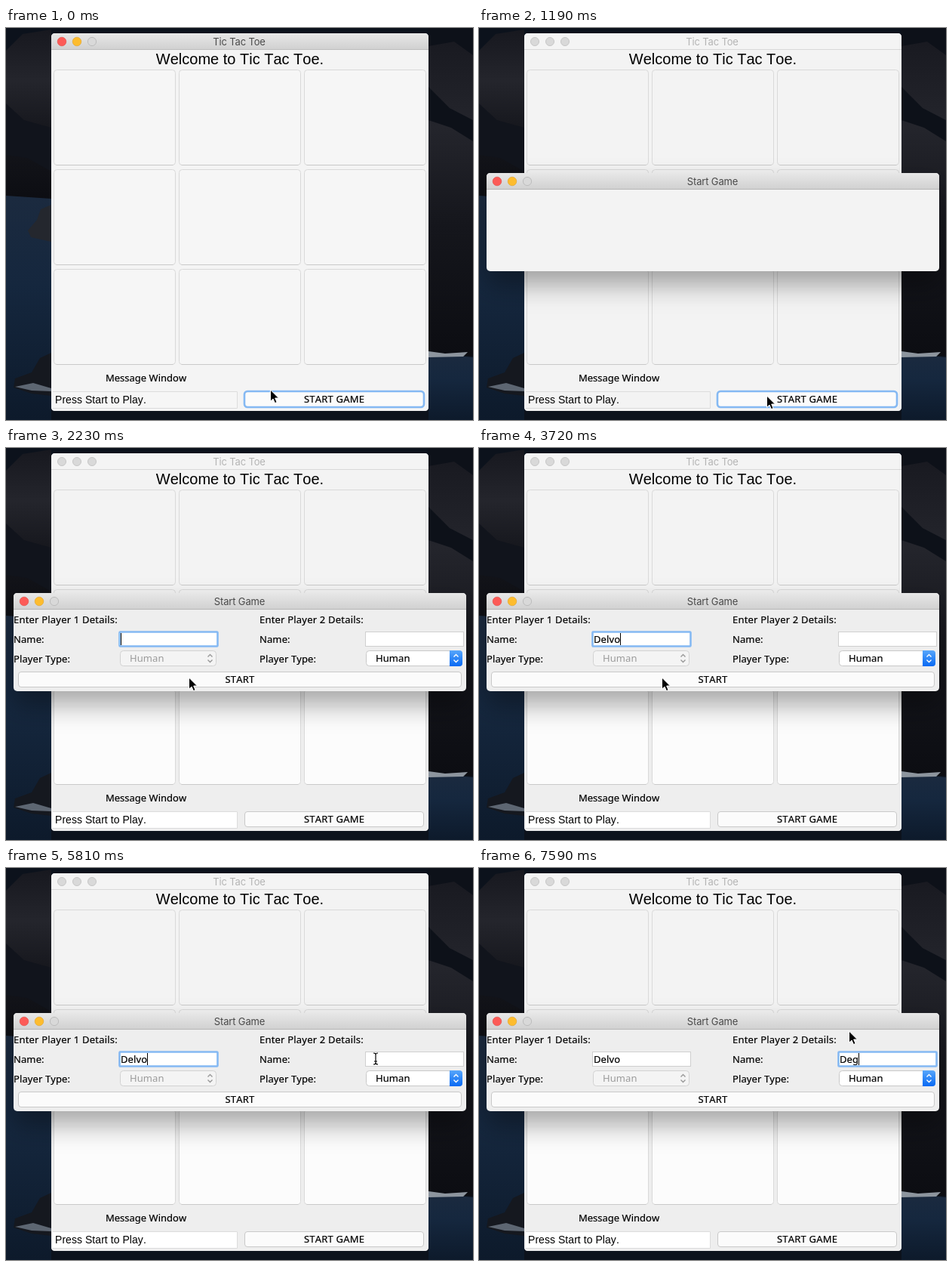
Animation of 619 by 519 pixels, one loop 8000 ms. Source, as an HTML page:

```html
<!DOCTYPE html>
<html lang="en">
<head>
<meta charset="utf-8">
<title>Tic Tac Toe</title>
<style>
html, body { margin: 0; width: 100%; height: 100%; overflow: hidden; background: #0c121c; }
svg { display: block; width: 619px; height: 519px; }
text { font: 13px "Noto Sans", "Open Sans", sans-serif; font-kerning: none; letter-spacing: .1px; fill: #000; stroke: #000; stroke-width: .2px; }
.title { font: 13px Inter, Roboto, sans-serif; letter-spacing: -.15px; fill: #4a4a4a; stroke: none; }
.big { font: 20px "Liberation Sans", Arial, sans-serif; font-kerning: none; letter-spacing: 0; stroke: none; }
.status { font: 14px "Liberation Sans", Arial, sans-serif; font-kerning: none; letter-spacing: .05px; stroke: none; }
.mid { text-anchor: middle; }
.head, .caps { letter-spacing: .2px; }
.tight { letter-spacing: 0; }
.off { fill: #9b9b9b; stroke: none; }

#stage { --bg: #f3f3f3; --low: #f3f3f3; --cell: #f3f3f3; --cell3: #f3f3f3; --field: #f3f3f3; }
#stage[data-phase=ready] { --bg: #f4f4f4; --low: #f4f4f4; --cell: #f6f6f6; --cell3: #f6f6f6; --field: #f6f6f6; }
#stage[data-phase=pressed] { --bg: #eee; --low: #eee; --cell: #f8f8f8; --cell3: #f8f8f8; --field: #f8f8f8; }
#stage[data-phase=open] { --low: #eee; --cell3: #fcfcfc; --field: #fff; }
.bg { fill: var(--bg); }
.low { fill: var(--low); }
.cell { fill: var(--cell); stroke: #d9d9d9; }
.cell.last { fill: var(--cell3); }
.edge { stroke: #c9c9c9; fill: none; }
.field { fill: var(--field); }
.button { fill: #fbfbfb; stroke: #c9c9c9; }
.input { fill: #fff; stroke: #cfcfcf; }
.ring { fill: none; stroke: #85b9f3; stroke-width: 2.6; }

[data-phase=pressed] #go { fill: url(#blue); stroke: none; }
[data-phase=pressed] #goRing { stroke: #4a9cfa; }
[data-phase=open] #goRing { display: none; }
[data-phase=ready] #dialog, [data-phase=pressed] #dialog { display: none; }
[data-phase=empty] #form { display: none; }
[data-phase=empty] #panel { fill: #f3f3f3; }
[data-phase=empty] .active, [data-phase=open] .active { display: none; }
[data-phase=ready] .inactive, [data-phase=pressed] .inactive { display: none; }
</style>
</head>
<body>
<svg id="stage" viewBox="0 0 619 519" data-phase="ready">
  <defs>
    <linearGradient id="bar" x2="0" y2="1"><stop stop-color="#e7e7e7"/><stop offset="1" stop-color="#d1d1d1"/></linearGradient>
    <linearGradient id="blue" x2="0" y2="1"><stop stop-color="#57a6fb"/><stop offset="1" stop-color="#0869f3"/></linearGradient>
    <linearGradient id="sea" x2="0" y2="1"><stop stop-color="#1b2a3f"/><stop offset=".4" stop-color="#15273e"/><stop offset="1" stop-color="#0d1a2b"/></linearGradient>
    <linearGradient id="cliff" x2="0" y2="1"><stop stop-color="#17181f"/><stop offset=".3" stop-color="#24252c"/><stop offset=".6" stop-color="#15161c"/><stop offset="1" stop-color="#0c0d12"/></linearGradient>
    <filter id="shade" x="-10%" y="-40%" width="120%" height="210%"><feDropShadow dx="0" dy="18" stdDeviation="17" flood-opacity=".34"/></filter>
    <g id="lights"><circle cx="14" cy="11" r="5.8" fill="#fc5b57" stroke="#e2463f" stroke-width=".6"/><circle cx="34" cy="11" r="5.8" fill="#fdbc2e" stroke="#e0a028" stroke-width=".6"/><circle cx="54" cy="11" r="5.6" fill="#d9d9d9" stroke="#bcbcbc"/></g>
    <path id="arrows" d="M-3-2 0-5 3-2M-3 2 0 5 3 2" fill="none" stroke-width="1.4"/>
  </defs>

  <g id="wallpaper">
    <path fill="#0c121c" d="M0 0H619V519H0Z"/>
    <path fill="url(#cliff)" d="M0 30 22 8 60 2V230H0Z"/>
    <path fill="#11141c" d="M0 100 24 122 60 132V190L28 172 0 168Z"/>
    <path fill="url(#sea)" d="M0 222 60 226V519H0Z"/>
    <path fill="#24272e" d="M60 234 46 240 41 254 29 268 33 277 60 283Z"/>
    <path fill="#15181f" d="M60 430 45 437 34 456 12 464 10 476 34 484 60 487Z"/>
    <path fill="#5d6672" d="M12 475 36 470 60 477V481L34 480Z"/>
    <path fill="url(#cliff)" d="M560 0H619V434H560Z"/>
    <path fill="#0d1119" d="M560 0H619V36L594 18 560 24ZM560 78 588 106 619 122V150L590 132 560 122Z"/>
    <path fill="url(#sea)" d="M560 430 619 436V519H560Z"/>
    <path fill="#8d959e" d="M560 428 582 431 612 429 606 435 560 436Z"/>
  </g>

  <g id="main">
    <rect class="bg" x="60" y="7" width="500" height="500" rx="5"/>
    <path class="low" d="M60 322H560V502Q560 507 555 507H65Q60 507 60 502Z"/>
    <g class="active">
      <path fill="url(#bar)" d="M60 28V12Q60 7 65 7H555Q560 7 560 12V28Z"/>
      <path stroke="#bdbdbd" d="M60 28.5H560"/>
      <use href="#lights" x="60" y="7"/>
      <text class="title mid" x="309" y="23">Tic Tac Toe</text>
    </g>
    <g class="inactive">
      <path fill="#f4f4f4" d="M60 28V12Q60 7 65 7H555Q560 7 560 12V28Z"/>
      <path stroke="#d8d8d8" d="M60 28.5H560"/>
      <g fill="#d9d9d9" stroke="#c6c6c6"><circle cx="74" cy="18" r="5.5"/><circle cx="94" cy="18" r="5.5"/><circle cx="114" cy="18" r="5.5"/></g>
      <text class="title mid" x="309" y="23" style="fill:#b4b4b4">Tic Tac Toe</text>
    </g>
    <text class="big mid" x="310" y="48">Welcome to Tic Tac Toe.</text>
    <g id="board"></g>
    <text class="tight" x="132" y="468">Message Window</text>
    <rect class="field" x="62" y="481" width="245" height="22"/>
    <path fill="none" stroke="#dcdcdc" d="M62 481.5H306.5V503.5H62"/>
    <text class="status" x="65" y="497">Press Start to Play.</text>
    <rect id="go" class="button" x="316.5" y="481.5" width="237" height="20" rx="3.5"/>
    <rect id="goRing" class="ring" x="316" y="481" width="238" height="21" rx="4"/>
    <text class="mid caps" x="435" y="496">START GAME</text>
  </g>

  <g id="dialog">
    <rect id="panel" x="10" y="192" width="600" height="130" rx="5" fill="#eee" filter="url(#shade)"/>
    <path fill="url(#bar)" d="M10 213V197Q10 192 15 192H605Q610 192 610 197V213Z"/>
    <path stroke="#b6b6b6" d="M10 213.5H610"/>
    <use href="#lights" x="10" y="192"/>
    <text class="title mid" x="309.5" y="208">Start Game</text>
    <g id="form">
      <g id="players"></g>
      <rect class="button" x="16.5" y="296.5" width="587" height="20" rx="3.5"/>
      <text class="mid caps" x="310" y="311">START</text>
      <path id="caret" stroke="#000" d="M0 245V261"/>
    </g>
  </g>

  <path id="arrow" d="M0 0V15.2L3.5 12 6 17.6 8.6 16.5 6.2 11H11Z" stroke="#fff" stroke-linejoin="round"/>
  <g id="beam" fill="none">
    <path id="stem" stroke="#fff" stroke-width="2.6" stroke-opacity=".7" d="M-3-7.5Q0-7.5 0-5.5Q0-7.5 3-7.5M0-6V6M-3 7.5Q0 7.5 0 5.5Q0 7.5 3 7.5M-2 3.5H2"/>
    <path stroke="#000" stroke-width="1.2" d="M-3-7.5Q0-7.5 0-5.5Q0-7.5 3-7.5M0-6V6M-3 7.5Q0 7.5 0 5.5Q0 7.5 3 7.5M-2 3.5H2"/>
  </g>
</svg>
<script>
const LOOP = 8000;
const FIRST = 'Delvo', SECOND = 'Deg';
const $ = id => document.getElementById(id);

// Each step overrides part of the state; everything else carries over.
const STEPS = [
  [0, { phase: 'ready', mouse: [350.5, 479], beam: false, focus: 0, caret: true, typed: [0, 0] }],
  [150, { mouse: [355, 481] }],
  [300, { mouse: [372, 486] }],
  [450, { mouse: [381.5, 487] }],
  [1050, { phase: 'pressed' }],
  [1190, { phase: 'empty' }],
  [1340, { phase: 'open' }],
  [1490, { mouse: [362, 452] }],
  [1630, { mouse: [305, 378] }],
  [1780, { mouse: [256, 318], caret: false }],
  [1930, { mouse: [242.5, 304] }],
  [2230, { caret: true }],
  [2820, { caret: false }],
  [2970, { caret: true, typed: [1, 0] }],
  [3120, { typed: [2, 0] }],
  [3270, { typed: [3, 0] }],
  [3420, { typed: [4, 0] }],
  [3720, { typed: [5, 0] }],
  [4320, { caret: false }],
  [4470, { mouse: [232, 309] }],
  [4620, { mouse: [240, 306] }],
  [4770, { mouse: [318, 288], caret: true }],
  [4910, { mouse: [420, 265] }],
  [5060, { mouse: [487, 252], beam: true }],
  [5210, { mouse: [490, 252.5], caret: false }],
  [5810, { caret: true }],
  [6110, { focus: 1 }],
  [6260, { mouse: [490, 249] }],
  [6410, { mouse: [491, 230], beam: false }],
  [6550, { mouse: [490.5, 216] }],
  [6700, { caret: false }],
  [7140, { caret: true }],
  [7440, { typed: [5, 2] }],
  [7590, { typed: [5, 3] }]
];

function buildBoard() {
  let out = '';
  for (let i = 0; i < 9; i++) {
    const x = 63.5 + i % 3 * 166, y = 55.5 + Math.floor(i / 3) * 132;
    out += `<rect class="cell ${i > 5 ? 'last' : ''}" x="${x}" y="${y}" width="161" height="126" rx="4"/>
      <path class="edge" d="M${x + 3} ${y + 126}h155"/>`;
  }
  $('board').innerHTML = out;
}

function buildPlayers() {
  const menu = i => i
    ? `<rect class="button" x="151.5" y="268.5" width="127" height="20" rx="4" style="fill:#fff"/>
       <path fill="url(#blue)" d="M262 268H275Q279 268 279 272V285Q279 289 275 289H262Z"/>
       <text x="164" y="283">Human</text><use href="#arrows" x="270.5" y="278.5" stroke="#fff"/>`
    : `<rect class="button" x="151.5" y="268.5" width="127" height="20" rx="4" style="fill:#f4f4f4;stroke:#d2d2d2"/>
       <text class="off" x="164" y="283">Human</text><use href="#arrows" x="270.5" y="278.5" stroke="#999"/>`;
  $('players').innerHTML = [0, 1].map(i => `<g transform="translate(${i * 326})">
    <text class="head" x="10" y="232">Enter Player ${i + 1} Details:</text>
    <text x="10" y="258">Name:</text>
    <text x="10" y="284">Player Type:</text>
    <rect class="input" x="150.5" y="243.5" width="130" height="19"/>
    <rect id="ring${i}" class="ring" x="150.5" y="243.5" width="130" height="19" rx="1"/>
    <text id="name${i}" x="152" y="258"></text>
    ${menu(i)}</g>`).join('');
}

function show(id, on) {
  $(id).style.display = on ? '' : 'none';
}

function render(t) {
  const s = {};
  for (const [at, change] of STEPS) if (at <= t) Object.assign(s, change);
  $('stage').dataset.phase = s.phase;
  [FIRST, SECOND].forEach((name, i) => {
    $('name' + i).textContent = name.slice(0, s.typed[i]);
    show('ring' + i, s.focus === i);
  });
  const len = s.typed[s.focus] ? $('name' + s.focus).getComputedTextLength() : 0;
  $('caret').setAttribute('transform', `translate(${Math.round(152 + 326 * s.focus + len) + .5})`);
  show('caret', s.caret);
  show('arrow', !s.beam);
  show('beam', s.beam);
  $(s.beam ? 'beam' : 'arrow').setAttribute('transform', `translate(${s.mouse})`);
}

buildBoard();
buildPlayers();

const start = performance.now();
function tick() {
  render((performance.now() - start) % LOOP);
  requestAnimationFrame(tick);
}
tick();
</script>
</body>
</html>
```
